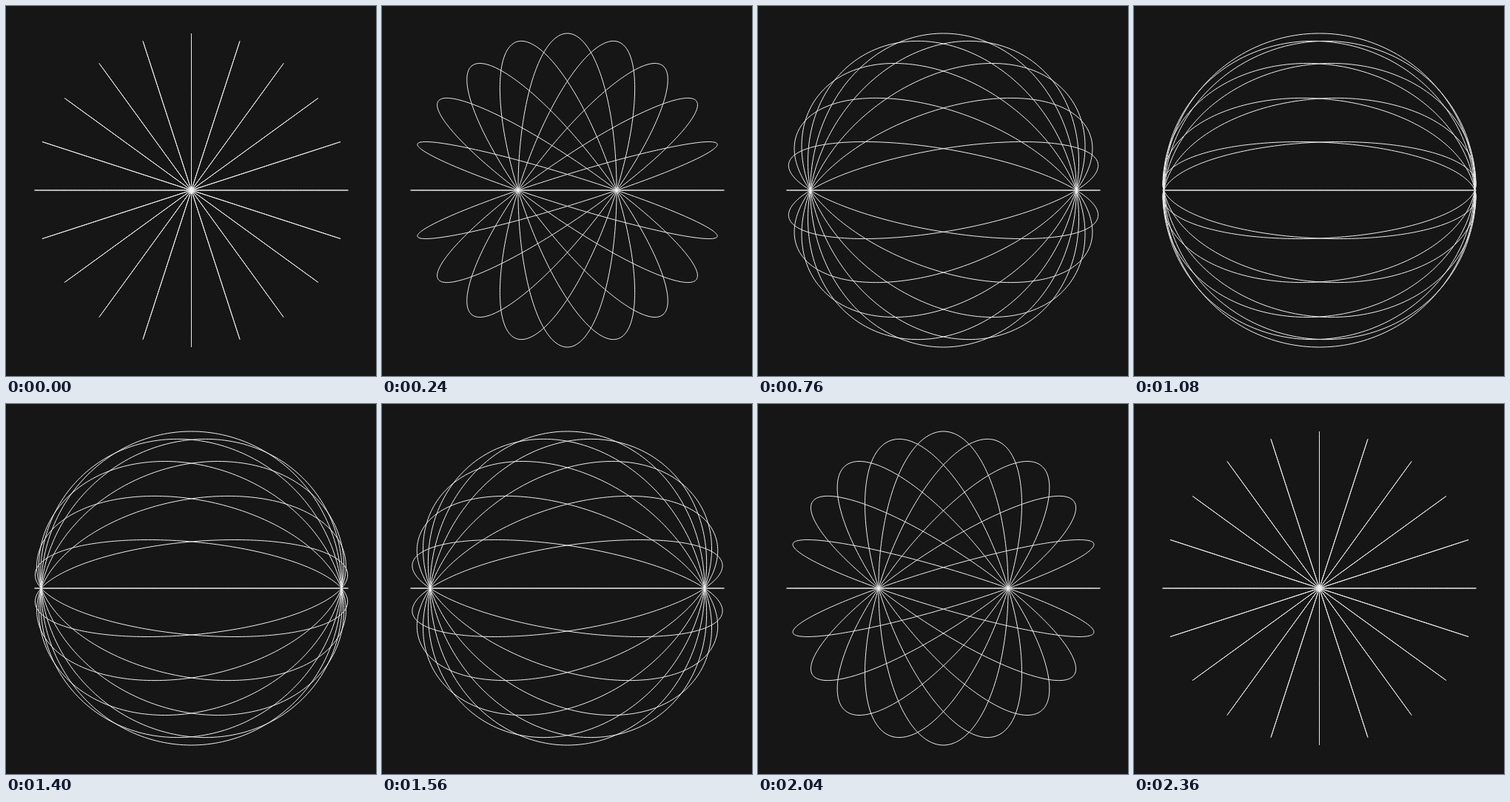
These frames come from a looping animation (500 px wide and 500 px high, 2.4 s). An HTML page with a canvas:

```html
<!DOCTYPE html>
<html lang="en">
<head>
<meta charset="utf-8">
<title>Turning rings</title>
<style>
  html, body { margin: 0; width: 100%; height: 100%; overflow: hidden; background: #161616; }
  canvas { display: block; width: 500px; height: 500px; }
</style>
</head>
<body>
<canvas id="stage" width="500" height="500"></canvas>
<script>
const ctx = document.getElementById('stage').getContext('2d');
const CX = 250.5, CY = 249, RADIUS = 212;
const RINGS = 10, SEGMENTS = 240;
const STEP = 40, STEPS = 60;

// A great circle tilted by `tilt`, seen after turning by `turn`.
function drawRing(tilt, turn) {
  ctx.beginPath();
  for (let i = 0; i < SEGMENTS; i++) {
    const p = i / SEGMENTS * 2 * Math.PI;
    const x = Math.sin(turn) * Math.cos(p) + Math.cos(turn) * Math.cos(tilt) * Math.sin(p);
    const y = Math.sin(tilt) * Math.sin(p);
    ctx.lineTo(CX + RADIUS * x, CY - RADIUS * y);
  }
  ctx.closePath();
  ctx.stroke();
}

function draw(now) {
  const step = Math.floor(now / STEP) % STEPS;
  const turn = Math.PI * step / (STEPS - 1);
  ctx.fillStyle = '#161616';
  ctx.fillRect(0, 0, 500, 500);
  ctx.strokeStyle = '#f0f0f0';
  ctx.lineWidth = 1;
  ctx.lineJoin = 'round';
  for (let k = 0; k < RINGS; k++) drawRing(k * Math.PI / RINGS, turn);
}

const start = performance.now();
function tick() {
  draw(performance.now() - start);
  requestAnimationFrame(tick);
}
tick();
</script>
</body>
</html>
```
